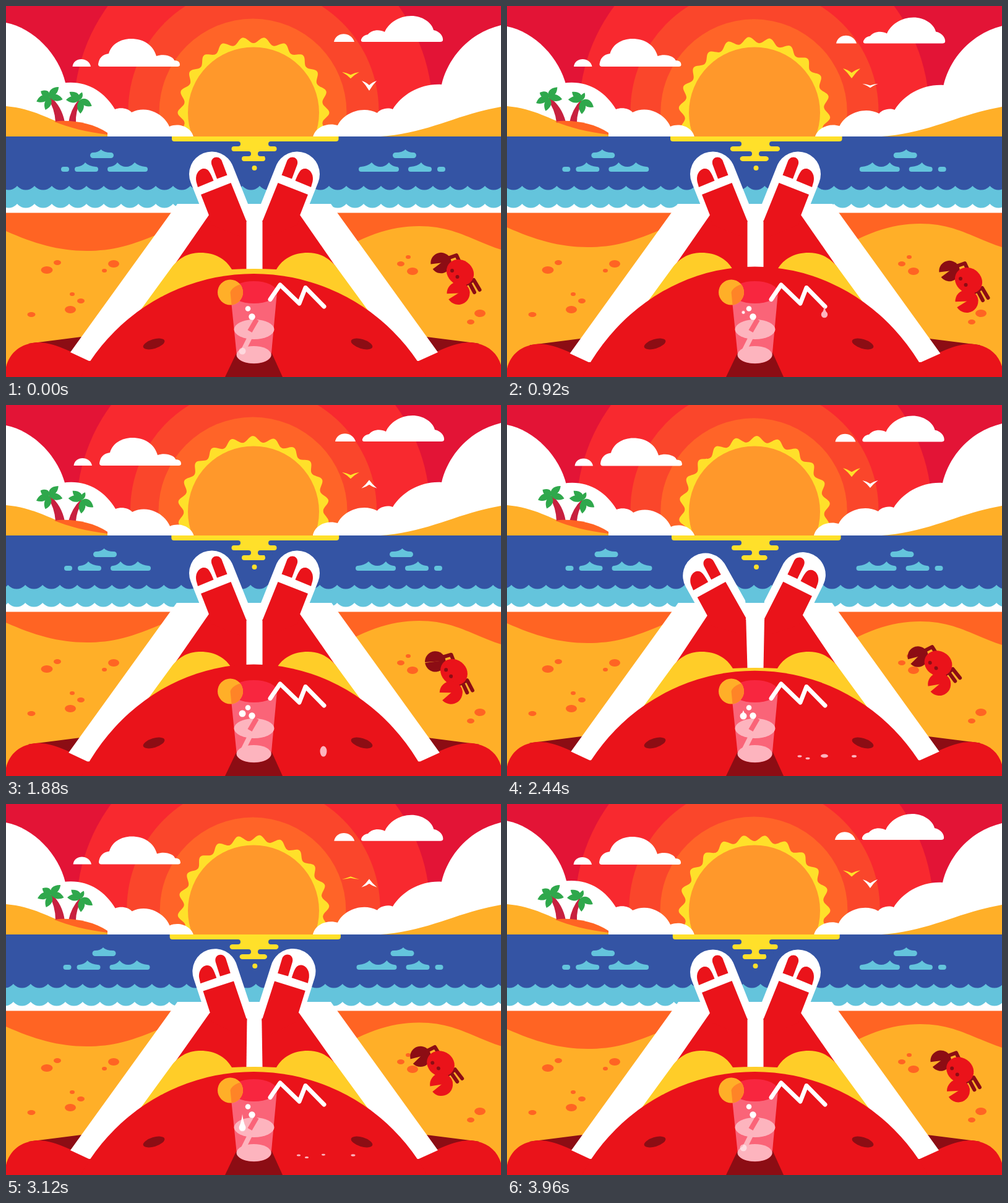
Write an HTML page without scripts that moves like this. It is 800 px wide and 600 px high and loops after 4 s.

```html
<!DOCTYPE html>
<html lang="en">
<head>
<meta charset="utf-8">
<title>Sunbathing</title>
<style>
@property --a { syntax: "<angle>"; inherits: true; initial-value: 0deg; }

html, body { margin: 0; height: 100%; overflow: hidden; background: #e31436; }
svg { display: block; width: 100vw; height: 100vh; }
g, path, circle, ellipse, rect { animation: 4s linear infinite; }

/* Gentle wobbles: each element supplies its own poses as --b to --f */
.drift { animation-name: drift; }
.swell { animation-name: swell; }
.sway { animation-name: sway; }
@keyframes drift {
  23% { translate: var(--b); } 47% { translate: var(--c); } 61% { translate: var(--d); }
  70% { translate: var(--e); } 86% { translate: var(--f); }
}
@keyframes swell {
  23% { scale: var(--b); } 47% { scale: var(--c); } 61% { scale: var(--d); }
  70% { scale: var(--e); } 86% { scale: var(--f); }
}
@keyframes sway {
  23% { rotate: var(--b); } 47% { rotate: var(--c); } 61% { rotate: var(--d); }
  70% { rotate: var(--e); } 86% { rotate: var(--f); }
}

.ring { transform-origin: 400px 170px; }
.glint { transform-origin: 401.5px 215px; }
.ripple { --b: .3px 0; --c: 5px 0; --d: 5.5px 0; --e: 5px 0; --f: 2px 0; }
.rays { animation-name: turn; }
@keyframes turn { from { rotate: 0deg; } to { rotate: 16.364deg; } }
.surf { animation-name: surf; }
@keyframes surf { to { translate: 28px 0; } }

.flapA { animation-name: flapA; }
@keyframes flapA {
  0%, to { translate: 0 112px; scale: 1 .65; } 23% { translate: 0 109px; scale: 1; }
  47% { translate: 0 114px; scale: 1 .65; } 61% { translate: 0 109px; scale: 1 .9; }
  70% { translate: 0 121px; scale: 1 -1; } 86% { translate: 0 118px; scale: 1 .45; }
}
.flapB { animation-name: flapB; }
@keyframes flapB {
  0%, to { translate: 0 129px; scale: .86 1; } 23% { translate: 0 129px; scale: .9 .4; }
  47%, 70%, 86% { translate: 0 128px; scale: .9 -.85; } 61% { translate: 0 128px; scale: .9 .75; }
}

.belly { transform-origin: 400px 575px; animation: breathe 4s ease-in-out infinite; }
@keyframes breathe { 0%, 70%, to { scale: 1; } 33%, 43% { scale: 1 1.1; } }
.towel { transform-origin: 400.5px 320px; animation: stretch 4s ease-in-out infinite; }
@keyframes stretch { 0%, 70%, to { scale: 1; } 33%, 43% { scale: 1.01 1.01; } }
.arms { animation: lower 4s ease-in-out infinite; }
@keyframes lower { 0%, 70%, to { translate: 0 0; } 33%, 43% { translate: 0 3px; } }

.limbL { animation: wagL 4s ease-in-out infinite; }
.limbR { animation: wagR 4s ease-in-out infinite; }
@keyframes wagL { 0%, 52%, 88%, to { --a: 0deg; } 61% { --a: -7.5deg; } 70% { --a: 7.3deg; } 86% { --a: -.6deg; } }
@keyframes wagR { 0%, 52%, 90%, to { --a: 0deg; } 61% { --a: -5deg; } 70% { --a: 6.2deg; } 86% { --a: 1.9deg; } }
.foot { transform-origin: 358px 364px; rotate: var(--a); }
.leg { transform-origin: 358px 425px; transform: skewX(calc(var(--a) * -.22)); }

.nipA { animation-name: nipA; }
.nipB { animation-name: nipB; }
@keyframes nipA { 0%, 23%, 61%, to { rotate: -30deg; } 47% { rotate: -3deg; } }
@keyframes nipB { 0%, 23%, 61%, to { rotate: -30deg; } 47% { rotate: -42deg; } }

.sink { animation-name: sink; }
@keyframes sink {
  0% { translate: 382px 558px; opacity: .5; } 3% { translate: 382px 560px; opacity: 0; scale: 1; }
  4%, 14% { translate: 382px 495px; opacity: 0; scale: 0; } 15% { opacity: 1; }
  23% { translate: 382px 495.5px; scale: .45; } 47% { translate: 382px 499px; scale: 1; }
  61% { translate: 382px 503px; } 70% { translate: 382px 518px; }
  86% { translate: 382px 529px; opacity: 1; } to { translate: 382px 558px; opacity: .5; }
}
.tailA { animation-name: tailA; }
@keyframes tailA { 0%, 47%, to { scale: 1 .2; } 61% { scale: 1 .42; } 70%, 88% { scale: 1; } }
.fall { animation-name: fall; }
@keyframes fall {
  0%, 11% { translate: 514px 487px; scale: 0; }
  23% { translate: 513px 499px; scale: .95; }
  38% { translate: 513px 502px; scale: 1; animation-timing-function: ease-in; }
  47% { translate: 513px 560px; scale: 1 1.6; }
  48.5% { translate: 513px 567px; scale: 1.1 .5; }
  48.6%, to { translate: 513px 567px; scale: 0; }
}
.tailB { animation-name: tailB; }
@keyframes tailB { 0%, 38% { scale: 1 .62; } 46%, to { scale: 1 .1; } }
.splash { transform-origin: 513px 567px; animation-name: splash; }
.spray { animation-name: spray; transform-box: fill-box; transform-origin: center; }
@keyframes splash { 0%, 48% { scale: 0; } 49%, 72% { scale: 1; } 84%, to { scale: 0; } }
@keyframes spray { 0%, 49% { scale: 0; } 53%, 72% { scale: 1; } 86% { scale: .7; } 95%, to { scale: 0; } }
</style>
</head>
<body>
<svg viewBox="0 0 800 600" preserveAspectRatio="none">
<defs>
  <!-- Sun rays built by doubling -->
  <path id="ray" d="M-16 -111.4C-10 -112.3 -6 -122.5 0 -122.5S10 -112.3 16 -111.4L0 0z"/>
  <g id="ray2"><use href="#ray" transform="rotate(-8.182)"/><use href="#ray" transform="rotate(8.182)"/></g>
  <g id="ray4"><use href="#ray2" transform="rotate(-16.364)"/><use href="#ray2" transform="rotate(16.364)"/></g>
  <g id="ray8"><use href="#ray4" transform="rotate(-32.727)"/><use href="#ray4" transform="rotate(32.727)"/></g>

  <path id="bird" d="M-14 -8Q-6 -6 0 -1Q6 -6 14 -8Q6 -1 0 8Q-6 -1 -14 -8z"/>
  <path id="leaf" d="M0 0C5 -8 14 -8 22 1C14 7 6 6 0 0z"/>
  <path id="jaw" d="M-1 0A1 1 0 0 1 1 0z"/>
  <path id="tail" d="M-5.2 -1.6Q-1.4 -10 0 -22Q1.4 -10 5.2 -1.6z"/>

  <g id="ripples" fill="#64c4dc">
    <path d="M140.500 246a4.500 4.500 0 0 1 0 -9Q149 237 153.500 232Q158 237 169.500 237a4.500 4.500 0 0 1 0 9z"/>
    <path d="M115 268a4 4 0 0 1 0 -8Q124 259 128 253Q133 259 145 260a4 4 0 0 1 0 8z"/>
    <path d="M168 268a4 4 0 0 1 0 -8Q176 259 180 253Q186 260 194 260T208 253Q214 259 225 260a4 4 0 0 1 0 8z"/>
    <rect x="89" y="260" width="13" height="8" rx="4"/>
  </g>

  <g id="arm">
    <path fill="#8c0d14" d="M36 546L122 535L108 566z"/>
    <path fill="#ea131a" d="M0 610V584C6 560 24 546 50 544C76 544 92 554 140 574V610z"/>
  </g>

  <g id="limb">
    <path class="foot" fill="#fff" d="M298.600 285.600A36.500 36.500 0 0 1 366.500 258.500L391 320V340L328 336L319 337z"/>
    <path class="leg" fill="#ea131a" d="M328 338L388.500 347V426H267z"/>
    <g class="foot" fill="#ea131a">
      <path d="M315 305L363.500 286L388.500 348L380 374L332 354L328 338.500z"/>
      <path d="M310 293L307.500 284C305 271 313 263 320 263C327 263 330 269 335.500 282.500z"/>
      <path d="M341 279.500L332.500 257C330 249 335 244.500 340 244.500C345 244.500 348 248 349 251L357.500 273.500z"/>
    </g>
  </g>

  <path id="cup" d="M362.500 463A38 18 0 0 1 438 463L428.500 566A28 14 0 0 1 373 566z"/>
  <clipPath id="inCup"><use href="#cup"/></clipPath>
</defs>

<!-- Sky -->
<rect width="800" height="600" fill="#e31436"/>
<circle class="ring swell" style="--b:.975;--c:.985;--d:.99;--e:.985;--f:.985" cx="399.500" cy="170" r="290" fill="#f8292f"/>
<circle class="ring swell" style="--b:.99;--c:.983;--d:.99;--e:1.007;--f:1.015" cx="400" cy="170" r="202.500" fill="#fa462b"/>
<circle class="ring swell" style="--b:.995;--c:1.007;--d:.995;--e:.99;--f:.995" cx="399" cy="172" r="151.500" fill="#ff6428"/>
<g transform="translate(400 172.500)" fill="#ffe02a">
  <circle r="112.500"/>
  <g class="rays">
    <use href="#ray8" transform="rotate(-65.455)"/><use href="#ray8" transform="rotate(65.455)"/>
  </g>
  <circle r="106" fill="#ff982b"/>
</g>

<g fill="#fff">
  <g class="drift" style="--b:.5px 0;--c:2px 0;--d:2px .5px;--e:1.500px 0;--f:.5px -1px">
    <path d="M107.500 98C109 82 134 82 137 98z"/>
    <path d="M153 98Q149 98 149 94Q151 79 166 77C170 62 185 53 202 53C222 53 238 63 243 81C256 76 271 82 272 88Q281 88 281 95Q281 98 277 98z"/>
  </g>
  <g class="drift" style="--b:2px 2.500px;--c:2px 1px;--d:.5px 1.500px;--e:.5px 2.500px;--f:0 1px">
    <path d="M530 58C533 41 558 41 563 58z"/>
    <path d="M577 58Q573 58 574 54Q577 47 585 46C590 39 603 37 612 42C618 28 635 16 655 16C672 16 688 26 691 39C702 41 707 50 706 56Q705 58 702 58z"/>
  </g>
  <path class="drift" style="--b:0 6px;--c:0 6px;--d:0 5px;--e:0 4px;--f:0 2px" d="M-10 25L0 27C45 36 85 78 96 124V220H-10z"/>
  <path class="drift" style="--b:0 0;--c:1px 1px;--d:1px 2px;--e:1px 2px;--f:0 1px" d="M90 125C128 119 158 137 176 167C186 163 198 166 203 172C227 160 255 174 264 195C281 188 300 197 303 212V220H90z"/>
  <path class="drift" style="--b:1.500px 1px;--c:0 -2px;--d:0 -1px;--e:0 -1px;--f:0 -1.500px" d="M810 28L800 31C750 43 715 82 704 127C670 125 640 143 625 167C615 163 603 168 600 173C575 160 545 174 536 193C520 188 500 195 496 212V220H810z"/>
</g>

<g transform="translate(557 0)" fill="#ffe02a"><g class="flapA"><use href="#bird"/></g></g>
<g transform="translate(587 0)" fill="#fff"><g class="flapB"><use href="#bird"/></g></g>

<!-- Shores -->
<path fill="#ffaf28" d="M0 162C45 166 70 184 100 193Q140 203 164 206V212H0z"/>
<path fill="#ffaf28" d="M588 212C680 209 720 177 800 163V212z"/>
<g class="sway" style="transform-origin:87px 187px;--b:-4deg;--c:-.5deg;--d:1.500deg;--e:3deg;--f:3deg">
  <path fill="#c8203f" d="M80 188Q79 166 67 148L72 147Q90 162 95 188z"/>
  <g transform="translate(70 147)" fill="#2fa84c">
    <use href="#leaf" transform="rotate(163) scale(1 -1)"/><use href="#leaf" transform="rotate(217) scale(.75 -1)"/>
    <use href="#leaf" transform="rotate(311)"/><use href="#leaf" transform="rotate(8)"/>
    <use href="#leaf" transform="rotate(104)"/>
  </g>
</g>
<g class="sway" style="transform-origin:107px 187px;--b:3deg;--c:6deg;--d:6deg;--e:5deg;--f:1.500deg">
  <path fill="#c8203f" d="M101 189Q104 168 117 152L121 154Q112 170 113 189z"/>
  <g transform="translate(119 152)" fill="#2fa84c">
    <use href="#leaf" transform="rotate(183) scale(1 -1)"/><use href="#leaf" transform="rotate(221) scale(.95 -1)"/>
    <use href="#leaf" transform="rotate(285) scale(.6)"/><use href="#leaf" transform="rotate(24)"/>
    <use href="#leaf" transform="rotate(84)"/>
  </g>
</g>
<path fill="#ff6423" d="M78 187C100 183 140 188 164 205V208C130 204 100 196 78 187z"/>

<!-- Sea -->
<rect y="211" width="800" height="124" fill="#fff"/>
<g fill="none" stroke-width="36" stroke-linecap="round" stroke-dasharray="0 28">
  <path class="surf" stroke="#64c4dc" d="M-52 308.500H860"/>
  <rect y="285" width="800" height="30" fill="#64c4dc"/>
  <path class="surf" stroke="#3454a4" d="M-52 279.500H860"/>
</g>
<rect y="211" width="800" height="75" fill="#3454a4"/>
<g class="ripple drift"><use href="#ripples"/></g>
<g transform="translate(799) scale(-1 1)"><g class="ripple drift"><use href="#ripples"/></g></g>
<g fill="#ffe02a">
  <path class="glint swell" style="--b:1.030 1;--c:1.005 1;--d:1.015 1;--e:1.030 1;--f:1.020 1" d="M268 211H537.500V215Q537.500 219 533 219H272Q268 219 268 215z"/>
  <rect x="372" y="217" width="60" height="12"/>
  <rect x="386" y="233" width="32" height="12"/>
  <g fill="#3454a4">
    <rect x="350" y="219" width="29" height="8" rx="4"/><rect x="424" y="219" width="29" height="8" rx="4"/>
    <rect x="372" y="235" width="24" height="8" rx="4"/><rect x="407" y="235" width="24" height="8" rx="4"/>
  </g>
  <rect class="glint swell" style="--b:1.100 1;--c:1;--d:1.040 1;--e:1.100 1;--f:1.060 1" x="364.500" y="227" width="73" height="8" rx="4"/>
  <rect class="glint swell" style="--b:1.220 1;--c:1;--d:1.100 1;--e:1.220 1;--f:1.120 1" x="381" y="243" width="38" height="8" rx="4"/>
  <circle class="drift" style="--b:1px 0;--c:0 0;--d:1.500px 0;--e:1.500px 0;--f:0 0" cx="401.500" cy="262" r="4"/>
</g>

<!-- Beach -->
<rect y="334.500" width="800" height="266" fill="#ff6423"/>
<g fill="#ffaf28">
  <path class="drift" style="--b:0 -6px;--c:0 -12px;--d:0 -11px;--e:0 -7px;--f:0 -1px" d="M0 364C45 384 85 396 130 396C180 396 215 384 290 349V620H0z"/>
  <path class="drift" style="--b:0 -4px;--c:0 -7px;--d:0 -6px;--e:0 -4px;--f:0 -1px" d="M520 408C575 372 620 356 668 356C725 356 755 380 800 394V620H520z"/>
</g>
<g fill="#ff6423">
  <ellipse cx="66" cy="427" rx="9.500" ry="6"/><ellipse cx="83" cy="415" rx="6" ry="4"/>
  <ellipse cx="174" cy="417" rx="9" ry="6"/><ellipse cx="159" cy="428" rx="4" ry="3"/>
  <ellipse cx="107" cy="466" rx="4" ry="3"/><ellipse cx="121" cy="477" rx="6" ry="4"/>
  <ellipse cx="104" cy="491" rx="9" ry="6"/><ellipse cx="41" cy="499" rx="6.500" ry="4"/>
  <ellipse cx="638" cy="417" rx="6" ry="4"/><ellipse cx="650" cy="406" rx="4" ry="3"/>
  <ellipse cx="657" cy="429" rx="9" ry="6"/><ellipse cx="766" cy="497" rx="9" ry="6"/>
  <ellipse cx="751" cy="511" rx="6" ry="4"/>
</g>

<!-- Crab -->
<g transform="translate(734 431)">
  <g class="drift" style="--b:12px 13px;--c:-10px 1px;--d:-37px -13px;--e:-37px -13px;--f:-26px -9px">
    <g class="sway" style="--b:0deg;--c:3deg;--d:-8deg;--e:-8deg;--f:-6deg">
      <g fill="none" stroke="#8c0d14" stroke-width="6" stroke-linejoin="round">
        <path d="M-20 -23L-6 -28L-1 -17"/>
        <path stroke-linecap="round" d="M8 20L22 12L31.500 28M15 17L23 32"/>
      </g>
      <g transform="translate(-31 -15.500) rotate(-7) scale(16.700)" fill="#8c0d14">
        <use href="#jaw"/><g class="nipA"><use href="#jaw" transform="rotate(180)"/></g>
      </g>
      <ellipse rx="23" ry="20" transform="rotate(35)" fill="#ea131a"/>
      <g transform="translate(-3 33.500) rotate(-2) scale(18.500)" fill="#ea131a">
        <use href="#jaw"/><g class="nipB"><use href="#jaw" transform="rotate(180)"/></g>
      </g>
      <circle cx="-13" cy="-3" r="3" fill="#8c0d14"/><circle cx="-4.500" cy="7" r="3" fill="#8c0d14"/>
    </g>
  </g>
</g>

<!-- Sunbather -->
<g class="arms">
  <use href="#arm"/>
  <use href="#arm" transform="translate(801) scale(-1 1)"/>
</g>
<path class="towel" fill="#fff" d="M277 320H525L698 560L667 574H134L104 560z"/>
<g class="limbL"><use href="#limb"/></g>
<g transform="translate(803) scale(-1 1)"><g class="limbR"><use href="#limb"/></g></g>
<path fill="#ffcd28" d="M215 495L269 421C284 403 300 399 314 399C338 399 355 409 365 426Q401 424 437 426C447 409 464 399 488 399C502 399 518 403 533 421L587 495z"/>
<circle class="belly" cx="400.500" cy="751" r="318" fill="#ea131a"/>
<g fill="#8c0d14">
  <ellipse rx="18" ry="7.500" transform="translate(239 546.500) rotate(-17)"/>
  <ellipse rx="18" ry="7.500" transform="translate(575 546.500) rotate(17)"/>
  <path d="M354 600L374 558H428L447 600z"/>
</g>

<!-- Drink -->
<use href="#cup" fill="#fa6478"/>
<ellipse cx="400.500" cy="463" rx="37.500" ry="18" fill="#f8263f"/>
<ellipse cx="401" cy="523" rx="32.500" ry="16" fill="#fdb4be"/>
<ellipse cx="400.500" cy="564" rx="28" ry="14" fill="#fdb4be"/>
<path d="M405 507L394 526" fill="none" stroke="#fa6478" stroke-width="8"/>
<path d="M396 532L383 558" fill="none" stroke="#fdb4be" stroke-width="8"/>
<circle cx="362.500" cy="463" r="20.500" fill="#ffaf28"/>
<circle cx="362.500" cy="463" r="20.500" fill="#ff8427" clip-path="url(#inCup)"/>
<path d="M427 474.500L443 451L474 481L484 455.500L514 486" fill="none" stroke="#fff" stroke-width="7" stroke-linecap="round" stroke-linejoin="round"/>
<g fill="#fff">
  <circle cx="391" cy="489.500" r="4.300"/><circle cx="397.500" cy="502.500" r="5.200"/>
  <g class="sink"><circle r="5.500"/><g class="tailA"><use href="#tail"/></g></g>
</g>
<g fill="#fdb4be">
  <g class="fall"><circle r="5.500"/><g class="tailB"><use href="#tail"/></g></g>
  <ellipse class="splash" cx="513" cy="567.500" rx="6" ry="3"/>
  <ellipse class="spray" cx="473" cy="568" rx="3.500" ry="1.800"/>
  <ellipse class="spray" cx="486" cy="571.500" rx="3.500" ry="1.800"/>
  <ellipse class="spray" cx="561" cy="568" rx="4" ry="2"/>
</g>
</svg>
</body>
</html>
```
